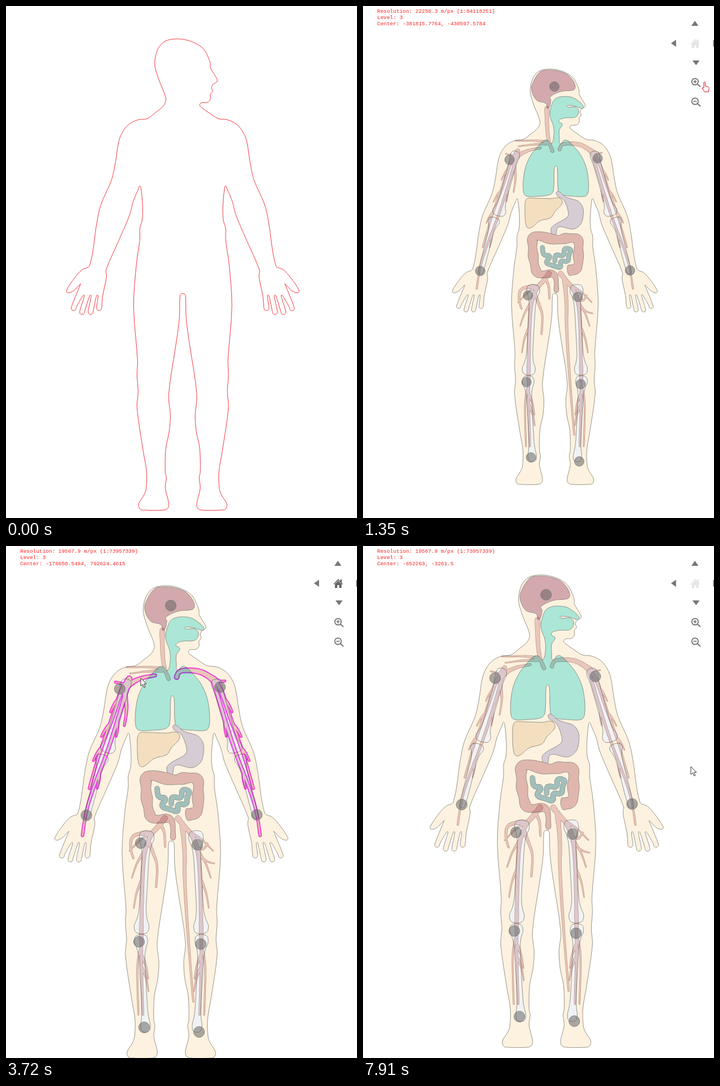
An HTML page that plays this animation: 620 by 903 pixels, repeating every 7990 ms.

```html
<!DOCTYPE html>
<html lang="en">
<head>
<meta charset="utf-8">
<title>Body map</title>
<style>
html, body { margin: 0; width: 100%; height: 100%; overflow: hidden; background: #fff; }
svg { display: block; width: 620px; height: 903px; }
#map * { vector-effect: non-scaling-stroke; stroke-linejoin: round; }
.shape { stroke: #8d8983; stroke-width: .9; }
.vessels { mix-blend-mode: multiply; }
.edge { fill: none; stroke: #bd9f9b; stroke-width: 1.5; }
.flesh { fill: #ead2d5; }
.gut { fill: none; stroke: #a3bfbb; stroke-width: 8; stroke-linecap: round; vector-effect: none !important; }
.gut.rim { stroke: #80938f; stroke-width: 9.6; }
.joint { fill: #5f5f5f; fill-opacity: .52; stroke: #777; stroke-width: .8; }
.shape.on, .joint.on { stroke: #e53fe0; stroke-width: 2.3; }
.on .edge { stroke: #f048ee; stroke-width: 4; }
.line .shape { fill: none; stroke: #f0232b; }
.line .edge { stroke: #f0232b; }
.line .flesh { fill: #fff; }
.line .gut { stroke: #fff; }
.line .gut.rim { stroke: #f0232b; }
text { font: 9.4px "Liberation Mono", monospace; fill: #f22; white-space: pre; }
.nav { fill: #777; }
.lens { fill: none; stroke: #6e6e6e; stroke-width: 1.7; }
</style>
</head>
<body>
<svg viewBox="0 0 620 903">
  <g id="map">
    <g id="skin"></g>
    <g id="bones"></g>
    <g id="organs"></g>
    <g id="vessels" class="vessels"></g>
    <g id="joints"></g>
  </g>
  <g id="ui">
    <text id="res" x="25" y="12"></text>
    <text x="25" y="23">Level: 3</text>
    <text id="center" x="25" y="34"></text>
    <path class="nav" d="M580 35h12.500l-6.200-9ZM553 59.500v12.500l-9-6.200ZM582 96h12.500l-6.200 8.500ZM618.500 60h2v11.500h-2Z"/>
    <path id="home" d="M578.500 67l8.300-9 3.700 4v-3h2.500v5.600l2 2.400-1.200 1-7-7.500-7 7.500ZM581 67.500l5.800-6 6 6V74h-4.300v-5h-3.300v5H581Z"/>
    <g class="lens">
      <circle cx="586.500" cy="133.500" r="5.700"/>
      <path d="M591 138l5 4.500M583.500 133.500h6M586.500 130.500v6"/>
      <circle cx="586.500" cy="168" r="5.700"/>
      <path d="M591 172.500l5 4.500M583.500 168h6"/>
    </g>
    <g id="cursor" fill="#fff">
      <path id="arrow" d="M0 0V14L3.400 11 5.800 16.500 8 15.500 5.700 10.200H10Z"/>
      <path id="hand" d="M3 1.500q1.300-2 2.500 0V8l5 1.500q2 .6 1.800 3l-1 6H4.500L0 12q0-2 3 0Z"/>
    </g>
  </g>
</svg>
<script>
const LOOP = 7990, FULL = 73957339, DOTS = 3779.52756;
const $ = id => document.getElementById(id);
const mix = (a, b, f) => a.map((v, i) => v + (b[i] - v) * f);
const flip = (p, axis = 313) => p.map(([x, y]) => [2 * axis - x, y]);

function add(parent, tag, attrs) {
  const el = document.createElementNS('http://www.w3.org/2000/svg', tag);
  for (const k in attrs) el.setAttribute(k, attrs[k]);
  return parent.appendChild(el);
}

const points = text => text.trim().split(/\s+/).map(p => p.split(',').map(Number));

// Smooth path through the points, handles limited by segment length.
function curve(p, closed = true) {
  const n = p.length;
  const at = i => closed ? p[(i + n) % n] : p[Math.max(0, Math.min(n - 1, i))];
  const dir = i => {
    const [ax, ay] = at(i - 1), [bx, by] = at(i + 1);
    const len = Math.hypot(bx - ax, by - ay) || 1;
    return [(bx - ax) / len, (by - ay) / len];
  };
  let d = 'M' + p[0];
  for (let i = 0; i < (closed ? n : n - 1); i++) {
    const a = at(i), b = at(i + 1), u = dir(i), v = dir(i + 1);
    const h = Math.hypot(b[0] - a[0], b[1] - a[1]) / 3;
    const c = [a[0] + u[0] * h, a[1] + u[1] * h, b[0] - v[0] * h, b[1] - v[1] * h, ...b];
    d += 'C' + c.map(x => x.toFixed(1));
  }
  return d + (closed ? 'Z' : '');
}

// Corner cutting that keeps both ends.
function smooth(p, rounds = 2) {
  while (rounds--) {
    const cut = p.slice(1).flatMap((b, i) => [mix(p[i], b, .25), mix(p[i], b, .75)]);
    p = [p[0], ...cut.slice(1, -1), p[p.length - 1]];
  }
  return p;
}

// Outline around a centre line; width(f) runs from f = 0 to 1.
function tube(spine, width) {
  const n = spine.length - 1;
  const side = s => spine.map(([x, y], i) => {
    const [ax, ay] = spine[Math.max(0, i - 1)], [bx, by] = spine[Math.min(n, i + 1)];
    const w = s * width(i / n) / 2 / Math.hypot(bx - ax, by - ay);
    return [x - (by - ay) * w, y + (bx - ax) * w];
  });
  return [...side(1), ...side(-1).reverse()];
}

const parts = {};
function shape(layer, id, fill, outline) {
  parts[id] = add($(layer), 'path', { class: 'shape', fill, d: curve(outline) });
}

// Body: one side, mirrored, between face and back of the head.
const face = points(`301,51 320,53 338,60 350,69 357,81 362,95 362,102 374,123 373,127 366,132 364,138
  366,143 362,149 362,157 357,163 346,164 343,168 346,172 360,182`);
const armOut = points(`376,192 392,194 407,201 418,213 426,231 432,268 439,300 458,344 465,375 478,452
  491,459 504,473 519,496 516,500 506,496 494,484 495,487`);
const fingers = [0, 1, 2, 3].flatMap(i => {
  const x = 506 - 15 * i, y = 526 + 8 * Math.sin(Math.PI * i / 3), gap = 489.5 - 12 * i;
  const tip = [[x + 4.5, y], [x + 3, y + 4.5], [x - 2.5, y + 4.5], [x - 4.5, y - 1]];
  return i < 3 ? [...tip, [gap, 504.5], [gap - 2.5, 504.5]] : tip;
});
const armIn = points('455,506 449,478 448,469 449,460 427,409 413,377 406,359 401,339 391,315 389,311 387,315');
const leg = points(`384,349 385,372 389,386 389,406 395,449 400,524 393,620 394,645 392,675 394,703 383,780
  377,817 378,847 382,858 391,873 389,882 383,884 346,884 339,880 338,871 344,845 342,827 344,817 343,775
  337,745 335,715 338,680 324,584 319,544 318,506 316,502`);
const side = [...armOut, ...fingers, ...armIn, ...leg];
const nape = points('265,181 279,169 283,156 271,124 264,101 264,86 270,67 282,55');
shape('skin', 'body', '#fdf2df', [...face, ...side, ...flip(side).reverse(), ...nape]);

// Long bone: a shaft with a knob at each end.
function bone(id, a, b, top, shaft, end) {
  const spine = Array.from({ length: 17 }, (_, i) => mix(a, b, i / 16));
  const knob = (f, w) => (w - shaft) * Math.exp(-((f / .13) ** 2));
  const outline = tube(spine, f => (shaft + knob(f, top) + knob(1 - f, end)) * (f % 1 ? 1 : .6));
  shape('bones', id + 'R', '#f1f2f3', outline);
  shape('bones', id + 'L', '#f1f2f3', flip(outline));
}
bone('humerus', [391, 217], [427, 344], 20, 15, 30);
bone('forearm', [434, 350], [463, 461], 26, 11, 10);
bone('femur', [356, 485], [366, 663], 30, 12, 30);
bone('shin', [367, 668], [358, 837], 27, 10, 19);

shape('organs', 'brain', '#d3a9ae', points(`301,53 320,55 338,62 350,75 354,87 350,93 325,96 303,107 305,114
  299,130 295,120 277,114 267,97 267,83 283,57`));

const throat = points(`311,183 310,165 304,148 304,132 315,110 345,107 364,118 371,128 367,130 352,125 337,126
  354,127 361,135 355,147 333,149 321,155 328,162 322,173 322,190`);
const lobe = points('324,201 331,194 338,194 350,205 364,222 375,245 380,270 380,298 374,306 350,306 327,303 320,295 318,250');
shape('organs', 'lungs', '#abe6d6', [...throat, ...lobe, [315, 245], ...flip(lobe, 315).reverse()]);

shape('organs', 'liver', '#f3dfc0', points(`256,312 270,310 305,311 320,309 327,314 327,322 313,337 305,349
  282,356 264,370 256,367 253,335`));
shape('organs', 'stomach', '#d6ccd4', points(`316,298 322,297 332,306 345,311 360,316 369,328 370,345 365,362
  350,372 320,368 315,383 309,385 305,372 313,363 338,348 340,338 331,314 318,305`));

const bowel = smooth(points('340,455 361,452 360,420 362,390 336,390 315,395 268,381 268,410 271,440 278,466 316,458 316,498'), 3);
shape('organs', 'colon', '#e0b7ad', tube(bowel, f => (19 + 2 * Math.sin(56 * f)) * (1 - .6 * f ** 9)));
const gut = curve(smooth(points(`288,409 290,424 305,426 294,440 311,446 325,450 324,436 340,437 341,424 346,413
  332,410 331,426 314,423 313,436`), 1), false);
for (const rim of [' rim', '']) add($('organs'), 'path', { class: 'gut' + rim, d: gut });

// Tapering vessel with twigs along it; twig side 1 points outward.
function vessel(text, w0, w1, twigs = 0, out = 1, reach = 26) {
  const p = smooth(points(text)), tubes = [{ p, w0, w1 }];
  for (let i = 1; i <= twigs; i++) {
    const k = Math.round((p.length - 2) * i / (twigs + 1)), [x, y] = p[k];
    const a = Math.atan2(p[k + 1][1] - y, p[k + 1][0] - x);
    const reachTo = (len, turn) => [x + len * Math.cos(a - out * turn), y + len * Math.sin(a - out * turn)];
    tubes.push({ p: [p[k], reachTo(reach / 2, .35), reachTo(reach, .25)], w0: 3.5, w1: .8 });
  }
  return tubes;
}
const mirrored = tubes => tubes.map(t => ({ ...t, p: flip(t.p) }));

const arm = [
  ...vessel('386,213 401,234 416,281 431,321 446,366 458,409', 6, 1.5, 3),
  ...vessel('386,214 392,235 406,282 426,345 450,405 464,450 470,492', 5, 2, 2, -1)
];
const limb = [
  ...vessel('323,459 335,475 350,490 361,520 364,560 365,610 366,665', 8, 5, 3, 1, 55),
  ...vessel('366,660 366,695 365,740 363,808', 5, 2, 2, -1, 45),
  ...vessel('367,690 374,720 371,808', 3, 1.5)
];
const vessels = {
  legs: [
    ...limb, ...mirrored(limb),
    ...vessel('332,468 337,520 336,570 344,690 352,785', 7, 2),
    ...vessel('358,520 373,537 389,541', 4, 1), ...vessel('356,512 370,517 377,505', 4, 2),
    ...vessel('272,500 282,525 289,545 286,583', 5, 2), ...vessel('290,469 301,482 302,512', 5, 2),
    ...vessel('274,487 244,490 240,512 246,532', 6, 2)
  ],
  neck: [...vessel('297,128 297,165 300,195 309,217', 7, 5), ...vessel('304,201 285,194 234,195', 5, 1),
    ...vessel('300,201 270,202 240,206', 4, 1)],
  left: [...mirrored(arm), ...vessel('285,209 262,213 242,222 226,238', 3, 8),
    ...vessel('230,238 235,268 230,298', 5, 1), ...vessel('236,230 225,223 214,221', 3, 1)],
  right: [...arm, ...vessel('322,214 326,201 350,200 370,204 392,220', 5, 8),
    ...vessel('386,213 396,220 408,219', 4, 1)]
};
for (const id in vessels) {
  parts[id] = add($('vessels'), 'g', {});
  const d = vessels[id].map(({ p, w0, w1 }) => curve(tube(p, f => w0 + (w1 - w0) * f))).join('');
  for (const name of ['edge', 'flesh']) add(parts[id], 'path', { class: name, d });
}

points('312,86 222,233 399,230 163,456 464,455 259,505 359,508 256,679 365,683 265,830 362,838')
  .forEach(([cx, cy], i) => parts['joint' + i] = add($('joints'), 'circle', { class: 'joint', cx, cy, r: 9.6 }));

// Spans during which a part is outlined.
const lit = {
  lungs: [[2200, 2920]], stomach: [[2350, 2920]], liver: [[2600, 2920]],
  right: [[3540, 4040], [5690, 6000]], left: [[3720, 4040], [5690, 6000]], neck: [[5690, 5840]],
  humerusR: [[6000, 6310], [6930, 7170]], forearmR: [[6460, 6860]], joint4: [[7500, 7910]]
};

// Views: x, y, map scale, centre x, centre y.
const far = [218.3, 201.9, 104119277, 1198555.0987, -3504696.5129];
const near = [63.7, 66.4, 84118251, -381815.7764, -430597.5784];
const home = [11.3, 0, FULL, -652263, -3261.5];
const chest = [0, 0, FULL, -662046.9396, 270688.8095];
const arms = [-21, 19, FULL, -176650.5494, 792624.4615];

// Bursts of movement: first and last change, number of changes, view and cursor reached.
const bursts = [
  [630, 1323.33, 9, near, [599, 133]],
  [1410, 1410, 1, home, [604, 200]],
  [1500, 1720, 4, home, [600, 241]],
  [1890, 2430, 8, chest, [305, 329]],
  [2920, 3630, 10, arms, [238, 233]],
  [4040, 4750, 10, home, [281, 190]],
  [5000, 5450, 7, home, [530, 199]],
  [5610, 6077, 7, home, [451, 376]],
  [6155, 6310, 3, home, [450, 382]],
  [6460, 6690, 4, home, [468, 437]],
  [6860, 7020, 3, home, [432, 300]],
  [7098, 7330, 4, home, [475, 417]],
  [7500, 7590, 2, home, [466, 452]],
  [7910, 7910, 1, home, [579, 389]]
];

function pose(t) {
  let view = far, cursor = [606, 1226];
  for (const [start, end, n, toView, toCursor] of bursts) {
    if (t < start) break;
    const gap = (end - start) / (n - 1) || 1;
    const f = Math.min(n, Math.floor((t - start) / gap + .001) + 1) / n;
    view = mix(view, toView, f);
    cursor = mix(cursor, toCursor, f);
  }
  return { view, cursor };
}

const show = (id, on) => { $(id).style.display = on ? '' : 'none'; };
const round = v => parseFloat(v.toFixed(4));

function draw(t) {
  const live = t >= 630, { view, cursor } = pose(t);
  const [x, y, scale, cx, cy] = live ? view : [0, 7.2, FULL / .9975, 0, 0];
  $('map').setAttribute('transform', `translate(${x} ${y}) scale(${FULL / scale})`);
  $('map').classList.toggle('line', !live);
  show('bones', t >= 140);
  show('organs', t >= 320);
  show('vessels', t >= 480);
  show('joints', live);
  show('ui', live);
  for (const id in lit) parts[id].classList.toggle('on', lit[id].some(([a, b]) => t >= a && t < b));

  $('res').textContent = `Resolution: ${(scale / DOTS).toFixed(1)} m/px (1:${Math.round(scale)})`;
  $('center').textContent = `Center: ${round(cx)}, ${round(cy)}`;
  $('home').setAttribute('fill', t >= 1890 && t < 4750 ? '#666' : '#e4e4e4');

  const hand = t >= 1323 && t < 1410;
  $('cursor').setAttribute('transform', `translate(${cursor})`);
  $('cursor').setAttribute('stroke', t < 2920 ? '#d8141c' : '#333');
  show('arrow', !hand);
  show('hand', hand);
}

function frame() {
  draw(performance.now() % LOOP);
  requestAnimationFrame(frame);
}
frame();
</script>
</body>
</html>
```
